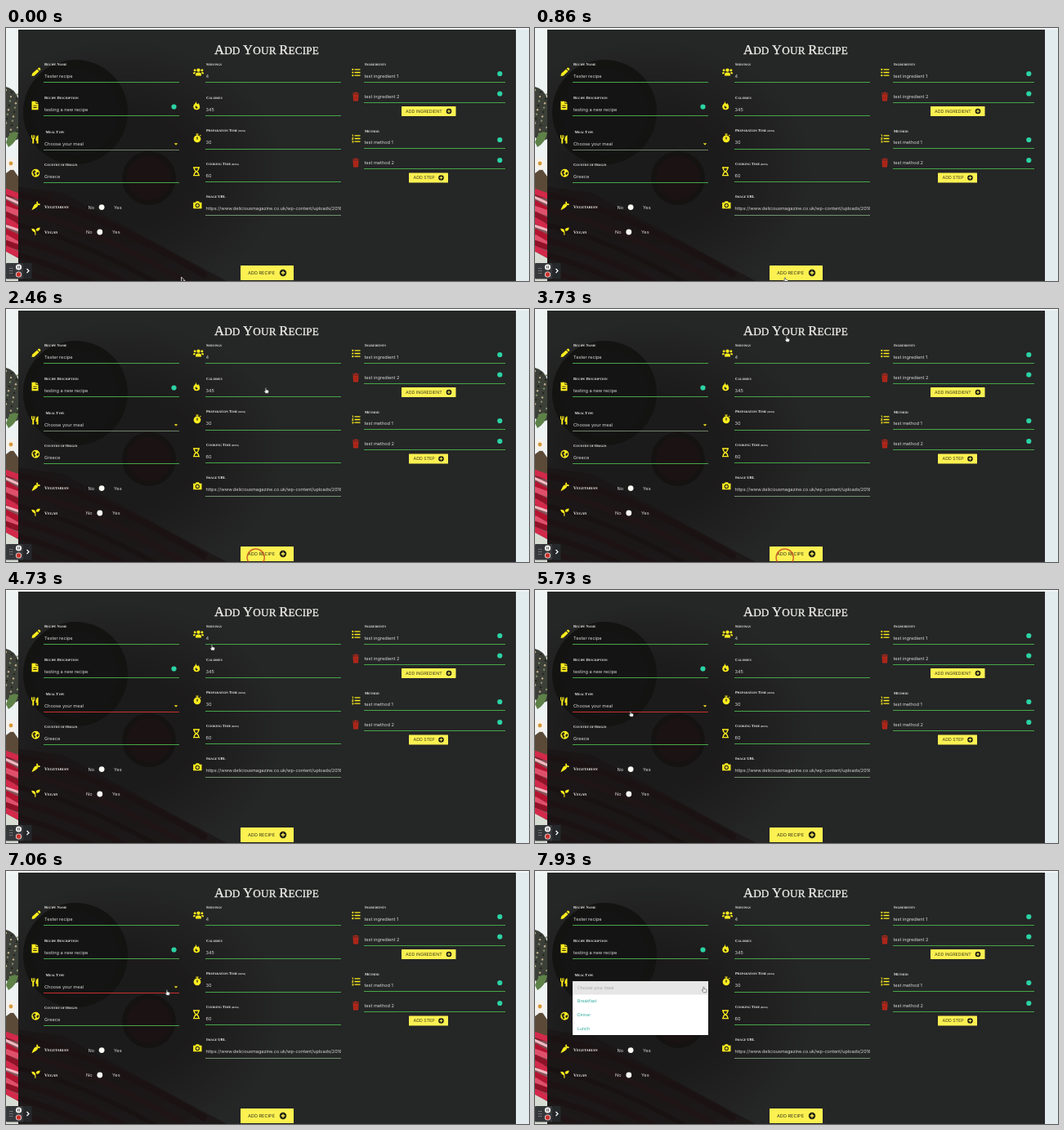
Write an HTML page that moves like this. It is 640x310 px and loops after 8 s.

```html
<!DOCTYPE html>
<html lang="en">
<head>
<meta charset="utf-8">
<title>Add Your Recipe</title>
<style>
  html, body { margin: 0; width: 100%; height: 100%; overflow: hidden; background: #e2ebee; }
  svg { display: block; width: 100vw; height: 100vh; text-rendering: geometricPrecision; }
  text { font: 5.6px Inter, sans-serif; fill: #d8d8d8; white-space: pre; }
  .caps { font-family: "Liberation Serif", serif; fill: #f0f0ec; }
  .icon { fill: #fbec1e; stroke: none; }
  .line { fill: none; stroke: #fbec1e; stroke-width: 1.3; }
</style>
</head>
<body>
<svg id="stage" viewBox="0 0 640 310" preserveAspectRatio="none">
  <defs>
    <clipPath id="urlClip"><rect x="244" y="212" width="166" height="16"/></clipPath>
    <clipPath id="edgeClip"><rect width="15" height="310"/></clipPath>
    <radialGradient id="shade">
      <stop offset=".45" stop-color="#4b2b2a" stop-opacity=".6"/>
      <stop offset="1" stop-color="#4b2b2a" stop-opacity="0"/>
    </radialGradient>
    <g id="trash" fill="#b8291b">
      <path d="M-4-4.6h2.4l.6-.8h2l.6.8H4v1.2h-8z"/>
      <path d="M-3.5-2.8h7L3 5q0 .6-.7.6h-4.6Q-3 5.6-3 5z"/>
      <path d="M-1.6-1.3v5.4M0-1.3v5.4M1.6-1.3v5.4" stroke="#8a1f15" stroke-width=".5"/>
    </g>
  </defs>
  <g id="photo"></g>
  <rect x="15" y="2" width="609" height="308" fill="#111" fill-opacity=".9"/>
  <g id="form"></g>
  <g id="icons"></g>
  <g id="recorder">
    <rect y="288" width="21.5" height="19.5" rx="1" fill="#36393b"/>
    <rect x="22" y="288" width="9.5" height="19.5" rx="1" fill="#25282a"/>
    <path d="M5 294v9M7.3 294v9" stroke="#b0b0b0" stroke-width="1" stroke-dasharray="1 2"/>
    <circle cx="15.5" cy="293" r="3.6" fill="#f4f4f4"/>
    <path d="M14.6 291.4v3.2M16.4 291.4v3.2" stroke="#444" stroke-width=".9"/>
    <circle cx="15.5" cy="302" r="3.6" fill="#e9dcdc"/>
    <circle cx="15.5" cy="302" r="2.7" fill="#c9302c"/>
    <path d="M25.5 295l2.5 2.5-2.5 2.5" fill="none" stroke="#fff" stroke-width="1.2"/>
  </g>
  <g id="menu">
    <rect x="46" y="135" width="166" height="66" fill="#fff"/>
    <rect x="46" y="135" width="166" height="16.5" fill="#e6e6e6"/>
  </g>
  <circle id="ring" cx="305.7" cy="304.6" r="10.6" fill="none" stroke="#c23a1c" stroke-opacity=".75" stroke-width="1.5"/>
  <path id="arrow" d="M0 0v6.4l1.5-1.3 1 2.2 1.1-.5-1-2.1h2z" fill="#222" stroke="#fff" stroke-width=".7"/>
  <path id="hand" d="M-.7 0q.7-.8 1.3 0v2.1l2.2.5q.8.3.7 1.2L3 6.2h-3.4L-2.3 3.6q.2-.9 1.6.1z" fill="#fff" stroke="#222" stroke-width=".5"/>
</svg>
<script>
const $ = id => document.getElementById(id);
const NS = 'http://www.w3.org/2000/svg';
const LOOP = 8000;

function add(parent, tag, attrs, text) {
  const el = document.createElementNS(NS, tag);
  for (const key in attrs) el.setAttribute(key, attrs[key]);
  if (text) el.textContent = text;
  parent.appendChild(el);
  return el;
}

const form = $('form'), photo = $('photo'), menu = $('menu');
const label = (x, y, text, style = '', parent = form) => add(parent, 'text', { x, y, style }, text);
const rule = (x, y, width, color = '#46a64a') =>
  add(form, 'rect', { x, y: Math.floor(y), width, height: 1, fill: color });
const dot = (x, y) => add(form, 'circle', { cx: x, cy: y, r: 3.1, fill: '#2bd3a4' });

// Capitals at full size, other letters as capitals at 80 %.
function caps(x, y, text, size = 4.6, weight = 700, note = '') {
  const el = add(form, 'text', { x, y, class: 'caps', style: `font-weight:${weight}` });
  for (const run of text.match(/[A-Z]+|[^A-Z]+/g)) {
    const scale = /[a-z]/.test(run) ? .8 : 1;
    add(el, 'tspan', { style: `font-size:${size * scale}px` }, run.toUpperCase());
  }
  if (note) add(el, 'tspan', { style: 'font-size:2.8px' }, ' ' + note);
  return el;
}

function button(x, y, w, h, text, textX, size, plusX, r) {
  const cy = y + h / 2, k = r * .58;
  add(form, 'rect', { x, y, width: w, height: h, rx: .6, fill: '#fcf151' });
  label(textX, cy + size * .36, text, `font-size:${size}px;fill:#3a381f`);
  add(form, 'circle', { cx: plusX, cy, r, fill: '#1c1c14' });
  add(form, 'path', { d: `M${plusX - k} ${cy}h${2 * k}M${plusX} ${cy - k}v${2 * k}`, stroke: '#fcf151', 'stroke-width': r * .3 });
}

function toggle(x, y, noX, yesX) {
  label(noX, y + 2, 'No');
  label(yesX, y + 2, 'Yes');
  add(form, 'circle', { cx: x, cy: y, r: 3.4, fill: '#fbfbf5' });
}

function drawEdge() {
  const edge = add(photo, 'g', { 'clip-path': 'url(#edgeClip)' });
  const disc = (cx, cy, r, fill) => add(edge, 'circle', { cx, cy, r, fill });
  add(edge, 'path', { d: 'M0 72Q10 74 15 86V136Q8 140 0 134z', fill: '#3c4038' });
  for (let i = 0; i < 22; i++)
    disc(i * 37 % 15, 76 + i * 2.7, 1.2, ['#c2ad8d', '#23261f', '#7d8b6a'][i % 3]);
  add(edge, 'path', { d: 'M0 140Q4 124 15 128Q13 140 3 146z', fill: '#5e8148' });
  add(edge, 'path', { d: 'M0 178L8 172L15 182V206L0 202z', fill: '#5c4a38' });
  for (let i = 0; i < 5; i++) {
    const a = i * Math.PI * .4;
    disc(6 + 4.5 * Math.cos(a), 166 + 4.5 * Math.sin(a), 3.6, '#f6f2ec');
  }
  disc(6, 166, 2.4, '#d59a3a');
  const tones = ['#d3294a', '#f2b9c2', '#b3142f', '#e0506b', '#8f1227'];
  for (let i = 0; i < 14; i++)
    add(edge, 'path', { d: `M-1 ${200 + i * 7}l17 ${6 + i % 3 * 2}`, stroke: tones[i % 5], 'stroke-width': i % 5 === 1 ? 3 : 7 });
  add(edge, 'path', { d: 'M0 274l15 8v28H0z', fill: '#d8ddd4' });
}

function drawPhoto() {
  add(photo, 'rect', { width: 640, height: 310, fill: '#e2ebee' });
  add(photo, 'ellipse', { cx: 140, cy: 175, rx: 200, ry: 160, fill: 'url(#shade)' });
  add(photo, 'circle', { cx: 85, cy: 103, r: 64, fill: '#2b2523' });
  add(photo, 'circle', { cx: 85, cy: 103, r: 53, fill: '#403431' });
  add(photo, 'path', { d: 'M0 192L70 202L270 310H0z', fill: '#6e2a30', 'fill-opacity': .7 });
  const tones = ['#7d1a2b', '#a83244', '#64202a', '#93263a'];
  for (let i = 0; i < 7; i++)
    add(photo, 'path', {
      d: `M-10 ${202 + i * 18}Q80 ${206 + i * 20} 245 ${304 + i * 22}`,
      fill: 'none', stroke: tones[i % 4], 'stroke-width': 8 - i % 3
    });
  add(photo, 'circle', { cx: 175, cy: 184, r: 33, fill: '#3a1d20' });
  add(photo, 'circle', { cx: 175, cy: 184, r: 27, fill: '#7d222c' });
  add(photo, 'rect', { width: 15, height: 200, fill: '#eef3f4' });
  add(photo, 'rect', { width: 640, height: 2, fill: '#f2f6f7' });
  drawEdge();
}

function drawForm() {
  const title = caps(255, 32.4, 'Add Your Recipe', 16.5, 400);
  title.style.letterSpacing = '.2px';
  title.style.stroke = '#f0f0ec';
  title.style.strokeWidth = '.3px';

  [['Recipe Name', 'Tester recipe', 46], ['Recipe Description', 'testing a new recipe', 86.6],
   ['Meal Type', 'Choose your meal', 129.4], ['Country of Origin', 'Greece', 169.3]].forEach(([name, value, y]) => {
    const meal = name === 'Meal Type';
    caps(meal ? 48.5 : 47, y, name);
    label(47, y + 15, value);
    if (!meal) rule(46, y + 20.5, 166);
  });
  dot(205.5, 96.5);
  add(form, 'path', { d: 'M205.8 141.3h4.4l-2.2 2.3z', class: 'icon' });

  [['Servings', '4'], ['Calories', '345'], ['Preparation Time', '30', '(MINS)'],
   ['Cooking Time', '60', '(MINS)'], ['Image URL', '']].forEach(([name, value, note], i) => {
    const y = 46 + i * 40.6;
    caps(245, y, name, 4.6, 700, note);
    label(244.5, y + 15, value);
    rule(244, y + 20.9, 166, i === 4 ? '#71926f' : '#46a64a');
  });
  label(244.5, 223.3, 'https://www.deliciousmagazine.co.uk/wp-content/uploads/2018/',
    'font-size:5.5px').setAttribute('clip-path', 'url(#urlClip)');

  caps(439, 46, 'Ingredients');
  caps(439, 127.5, 'Method');
  [['test ingredient 1', 61, 56], ['test ingredient 2', 85.6, 80.5],
   ['test method 1', 142.3, 137], ['test method 2', 167, 162]].forEach(([value, y, dotY]) => {
    label(438.5, y, value);
    rule(438, y + 5.6, 173);
    dot(604.3, dotY);
  });

  caps(47, 221.3, 'Vegetarian', 5.4);
  caps(47, 251.5, 'Vegan', 5.4);
  toggle(117.1, 219.6, 100.5, 132);
  toggle(114.8, 250, 98, 130);

  button(484, 96, 66.5, 12, 'ADD INGREDIENT', 489, 5.3, 542, 3.3);
  button(493, 177.5, 48, 12, 'ADD STEP', 498.5, 5.3, 532.5, 3.3);
  button(287, 291, 65, 18, 'ADD RECIPE', 296, 5.6, 339, 4.2);
}

function drawIcons() {
  const icon = (x, y, solid, line = '') => {
    const g = add($('icons'), 'g', { transform: `translate(${x} ${y})` });
    if (solid) add(g, 'path', { d: solid, class: 'icon', 'fill-rule': 'evenodd' });
    if (line) add(g, 'path', { d: line, class: 'line' });
  };
  const disc = (x, y, r) => `M${x - r} ${y}a${r} ${r} 0 1 0 ${2 * r} 0a${r} ${r} 0 1 0 ${-2 * r} 0z`;
  // pencil, document, cutlery, globe
  icon(36.5, 54, 'M-5 5l.6-3.2L1.5-3.6l2.6 2.6L-1.8 4.5zM2.2-4.3l1-1q.8-.5 1.4.1l1 1q.6.7 0 1.4l-1 1z');
  icon(35.5, 95, 'M-4-5.3h5v3.1h3v7.5h-8zM1.7-5.3L4-2.9H1.7zM-2.2-.3v.9h4.4v-.9zM-2.2 2v.9h4.4V2z');
  icon(35.5, 136.5, 'M-4.5-5.3h1v3.5h.7v-3.5h1v3.5h.7v-3.5h1q.7 4-1.2 5.1V5h-1.9V-.2Q-5-1.3-4.5-5.3zM4-5.3V5H2V1.5H.8Q.8-4.5 4-5.3z');
  icon(36.3, 177.8, disc(0, 0, 5) + 'M-3.8-1.5l2.3-2 1.5.8-.5 1.8L-2 0l2 1.2-.8 2.3-1.2-.3zM1.3-.5l2.2-1 .5 1.8-1.5 2L1 1.5z');
  // carrot, seedling
  icon(36.5, 218, 'M-5 5.2Q-3-.5-.8-2.2 1-3 2.2-1.7 3.2-.2 1.7 1.1 0 3-5 5.2zM.7-3Q.3-5 1.7-5.8 2.9-4.5 2.6-3 4.5-3.5 5.5-1.8 4-.3 2.6-1.2z');
  icon(36.5, 249, 'M-5.2-3.2Q-.2-3.3-.1 1.2V4.8H-1.2V1.5Q-5-.2-5.2-3.2zM5.2-4.5Q5.1-.4 1 .1q-.2-1.4-1-2.3Q1.5-4.5 5.2-4.5z');
  // people, flame, stopwatch, hourglass, camera
  icon(235.5, 54, disc(0, -2.4, 2.2) + disc(-4.4, -2.2, 1.5) + disc(4.4, -2.2, 1.5) +
    'M-3.5 4.5V2.5Q-3.3.4-1 .4h2q2.3 0 2.5 2.1v2zM-6.4 2.3V1Q-6.2-.1-5-.1h1.4Q-4.2.8-4.3 2.3zM6.4 2.3V1Q6.2-.1 5-.1H3.6Q4.2.8 4.3 2.3z');
  icon(233.3, 95, 'M-.8-5.5Q-.5-3 1-1.5q.9-.7.8-1.8Q4.3-.6 4 2 3.3 5.2 0 5.3-3.8 5-4.1 1.5-4-1-2-2.5-.7-3.7-.8-5.5zM0 3.7q1.7-.4 1.3-2L.4 2-.8 0Q-2.8 3 0 3.7z');
  icon(234, 135, disc(0, .8, 4.4) + 'M-1.6-5.6h3.2v1.2h-1v1h-1.2v-1h-1zM3-3.5l.9-.8.9.9-.9.9zM-.6-1.6h1.2v3h-1.2z');
  icon(233, 175.8, '', 'M-4-4.8h8M-4 4.8h8M-2.8-4.5Q-2.8-1.3 0 0 2.8 1.3 2.8 4.5M2.8-4.5Q2.8-1.3 0 0-2.8 1.3-2.8 4.5');
  icon(234.3, 216.8, 'M-5.2-3h2.7l.8-1.6h3.4L2.5-3h2.7v7.5H-5.2z' + disc(0, .6, 2.6) + disc(0, .6, 1.6));
  // bulleted and numbered lists
  const bars = 'M-2-3.7h7M-2 0h7M-2 3.7h7';
  icon(428.5, 54.5, disc(-4.2, -3.7, 1.1) + disc(-4.2, 0, 1.1) + disc(-4.2, 3.7, 1.1), bars);
  icon(428.5, 135.5, 'M-5-4.9h1.3v2.7h-.8v-1.9H-5zM-5.2-1.2h1.9v1l-1 .9h1v.7h-2v-.7l1.1-1.1h-1zM-5.2 2.6h2v2.4h-2v-.6h1.2v-.4h-.9v-.5h.9v-.3h-1.2z', bars);
  for (const y of [84, 165]) add($('icons'), 'use', { href: '#trash', x: 428, y });
}

drawPhoto();
drawForm();
drawIcons();
const mealRule = rule(46, 149.5, 166);
label(52, 144.8, 'Choose your meal', 'font-size:5.2px;fill:#a5a5a5', menu);
['Breakfast', 'Dinner', 'Lunch'].forEach((text, i) =>
  label(52, 161.2 + i * 16.7, text, 'font-size:5.2px;fill:#26a69a', menu));

// Pointer stops: time, x, y
const path = [
  [0, 214.5, 305], [120, 214.5, 305], [800, 306, 306], [1700, 306, 306],
  [2460, 318, 97], [3400, 308, 34], [4300, 308, 34], [5500, 117, 149],
  [6300, 117, 149], [7060, 197, 146], [7600, 206.5, 142.5], [LOOP, 206.5, 142.5]
];
const CLICK = 1260, INVALID = 4530, OPEN = 7630;

function pointer(t) {
  const i = Math.max(1, path.findIndex(p => p[0] >= t));
  const [t0, x0, y0] = path[i - 1], [t1, x1, y1] = path[i];
  const k = (t - t0) / (t1 - t0), e = k * k * (3 - 2 * k);
  return [x0 + (x1 - x0) * e, y0 + (y1 - y0) * e];
}

function snap(t) {
  if (t < 60) return 0;
  const rest = (t - 60) % 200;
  return t - rest + (rest >= 70 ? 70 : 0);
}

const show = (el, on) => el.setAttribute('visibility', on ? 'visible' : 'hidden');

function render(time) {
  const t = snap(time);
  const [x, y] = pointer(t);
  const asHand = x > 287 || t > CLICK;
  for (const id of ['arrow', 'hand']) {
    $(id).setAttribute('transform', `translate(${x} ${y})`);
    show($(id), (id === 'hand') === asHand);
  }
  show($('ring'), t >= CLICK && t < INVALID);
  mealRule.setAttribute('fill', t >= INVALID ? '#c9302c' : '#71826d');

  const k = Math.min(1, Math.max(0, (t - OPEN) / 150));
  const e = 1 - (1 - k) ** 5, s = .3 + .7 * e;
  show(menu, k > 0);
  menu.setAttribute('opacity', e);
  menu.setAttribute('transform', `translate(46 135) scale(${s}) translate(-46 -135)`);
}

const start = performance.now();
function tick() {
  render((performance.now() - start) % LOOP);
  requestAnimationFrame(tick);
}
tick();
</script>
</body>
</html>
```
